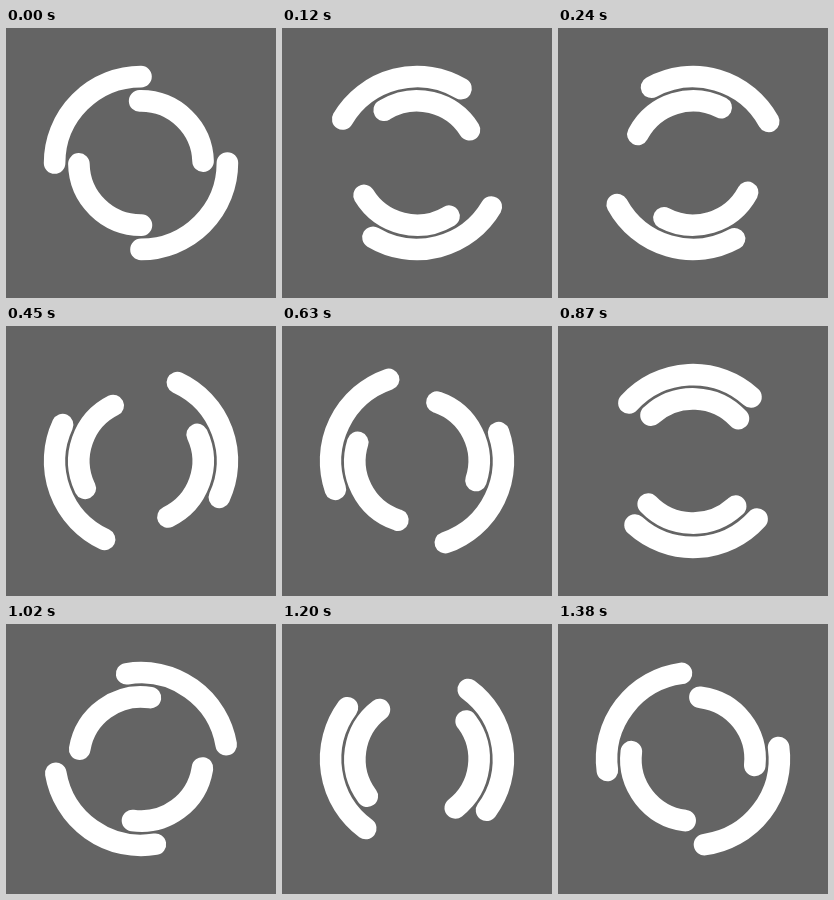
Recreate the animation shown at these times as an HTML page. Size 270 by 270 pixels, loop 1410 ms.

```html
<!DOCTYPE html>
<html lang="en">
<head>
<meta charset="utf-8">
<title>Double ring spinner</title>
<style>
  html, body { margin: 0; height: 100%; overflow: hidden; background: #646464; }
  svg { display: block; width: 100vw; height: 100vh; }
  circle { fill: none; stroke: #fff; stroke-width: 8; stroke-linecap: round; }
</style>
</head>
<body>
<svg viewBox="-50 -50 100 100">
  <!-- pathLength 4 makes each dash a quarter turn -->
  <circle id="outer" r="32" pathLength="4" stroke-dasharray="1"/>
  <circle id="inner" r="23" pathLength="4" stroke-dasharray="1" stroke-dashoffset="1"/>
</svg>
<script>
  const LOOP = 1410, STEP = 30;
  const outer = document.getElementById('outer');
  const inner = document.getElementById('inner');
  const rotate = (ring, angle) => ring.setAttribute('transform', `rotate(${angle})`);
  let start;

  function draw(now) {
    start ??= now;
    const time = Math.floor((now - start) % LOOP / STEP) * STEP;
    const angle = 360 * time / LOOP;
    rotate(outer, angle);
    rotate(inner, -angle);
    requestAnimationFrame(draw);
  }
  requestAnimationFrame(draw);
</script>
</body>
</html>
```
